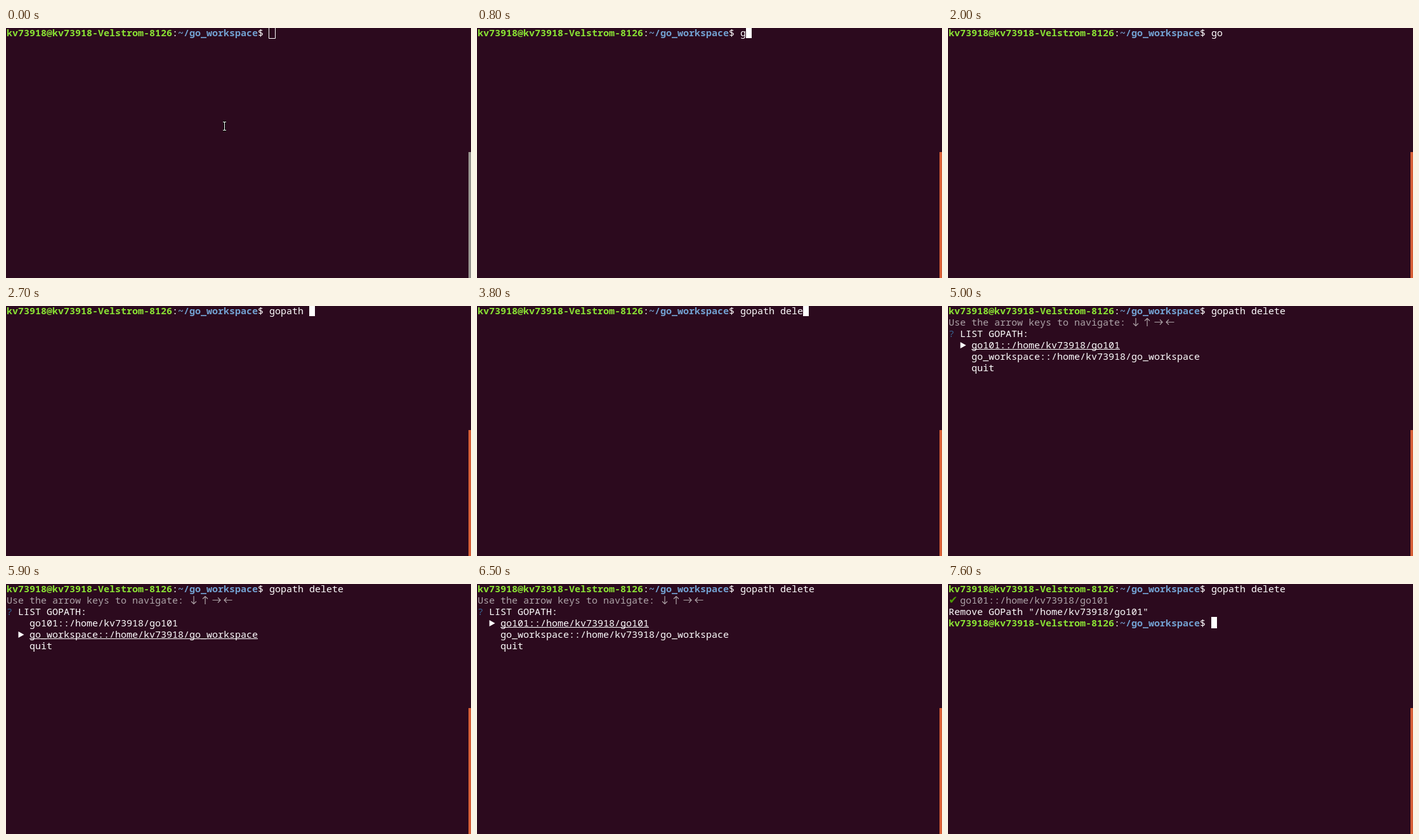
These frames come from a looping animation (733 by 395 pixels, 8000 ms). An HTML page with a canvas:

```html
<!DOCTYPE html>
<html lang="en">
<head>
<meta charset="utf-8">
<title>gopath delete</title>
<style>
  html, body { margin: 0; width: 100%; height: 100%; overflow: hidden; background: #2c0a1e; }
  canvas { display: block; }
</style>
</head>
<body>
<canvas id="stage" width="733" height="395"></canvas>
<script>
const ctx = document.getElementById('stage').getContext('2d');
const LOOP = 8000, CELL = 9, ROW = 18;
const BG = '#2c0a1e', WHITE = '#ffffff', DIM = '#ada3a8', GREEN = '#8ae234', BLUE = '#729fcf';
const USER = 'kv73918', HOST = USER + '-Velstrom-8126';
const PROMPT_LENGTH = `${USER}@${HOST}:~/go_workspace$ `.length;
const OPTIONS = [`go101::/home/${USER}/go101`, `go_workspace::/home/${USER}/go_workspace`, 'quit'];

// Time, typed command, cursor style
const TYPING = [
  [0, '', 'hollow'], [400, '', 'solid'], [800, 'g', 'solid'], [1000, 'go', 'solid'],
  [2000, 'go', 'off'], [2400, 'go', 'solid'], [2500, 'gop', 'solid'], [2700, 'gopath ', 'solid'],
  [3500, 'gopath d', 'solid'], [3600, 'gopath de', 'solid'], [3700, 'gopath del', 'solid'],
  [3800, 'gopath dele', 'solid'], [4000, 'gopath delet', 'solid'],
  [4200, 'gopath delete', 'solid'], [4600, 'gopath delete', 'off']
];

const cellX = col => 1 + col * CELL;

function rect(x, y, w, h, color) {
  ctx.fillStyle = color;
  ctx.fillRect(x, y, w, h);
}

function line(path, color, width) {
  ctx.strokeStyle = color;
  ctx.lineWidth = width;
  ctx.stroke(new Path2D(path));
}

function write(text, col, row, color = WHITE, bold = false) {
  ctx.font = `${bold ? 'bold ' : ''}15px "Noto Sans Mono", monospace`;
  ctx.fillStyle = color;
  ctx.fillText(text, cellX(col), 13 + row * ROW);
  return col + text.length;
}

function prompt(row) {
  let col = write(`${USER}@${HOST}`, 0, row, GREEN, true);
  col = write(':', col, row);
  col = write('~/go_workspace', col, row, BLUE, true);
  write('$', col, row);
}

function cursor(col, row, style) {
  const x = cellX(col), y = row * ROW - 2;
  if (style === 'solid') rect(x, y, CELL, ROW, WHITE);
  // The top edge lies above the visible area.
  if (style === 'hollow') line(`M${x - 0.5} 0V16.5H${x + CELL + 0.5}V0`, WHITE, 1);
}

function arrow(x, y, angle) {
  ctx.save();
  ctx.translate(x, y);
  ctx.rotate(angle);
  line('M-6.5 0H6M2 -4L6 0L2 4', DIM, 1.2);
  ctx.restore();
}

function menu(selected) {
  write('Use the arrow keys to navigate:', 0, 1, DIM);
  [1, -1, 0, 2].forEach((turns, i) => arrow(296 + i * 18, 25.5, turns * Math.PI / 2));
  write('?', 0, 2, '#37618f');
  write('LIST GOPATH:', 2, 2);
  OPTIONS.forEach((option, i) => write(option, 4, 3 + i));

  const top = (3 + selected) * ROW;
  ctx.fillStyle = WHITE;
  ctx.fill(new Path2D(`M19.5 ${top + 3}L28.5 ${top + 8}L19.5 ${top + 13}Z`));
  rect(cellX(4), top + 14, OPTIONS[selected].length * CELL, 1, WHITE);
}

function result() {
  ctx.font = '17px "DejaVu Sans", sans-serif';
  ctx.fillStyle = '#4e9a06';
  ctx.fillText('✔', 1, 31);
  write(OPTIONS[0], 2, 1, DIM);
  write(`Remove GOPath "/home/${USER}/go101"`, 0, 2);
  prompt(3);
  cursor(PROMPT_LENGTH, 3, 'solid');
}

function scrollbar(t) {
  rect(729, 196, 4, 199, t < 400 ? '#999690' : t < 500 ? '#b87b64' : '#d65f37');
}

function pointer() {
  const beam = 'M342 148.5H347M344.5 149V161M342 161.5H347';
  line(beam, '#000000', 3);
  line(beam, '#ffffff', 1);
}

function draw(t) {
  rect(0, 0, 733, 395, BG);
  scrollbar(t);
  prompt(0);

  const [, command, style] = TYPING.findLast(([start]) => t >= start);
  write(command, PROMPT_LENGTH, 0);
  cursor(PROMPT_LENGTH + command.length, 0, style);

  if (t < 800) pointer();
  if (t >= 7600) result();
  else if (t >= 5000) menu(t >= 5900 && t < 6500 ? 1 : 0);
}

const began = performance.now();
function animate() {
  draw((performance.now() - began) % LOOP);
  requestAnimationFrame(animate);
}
animate();
</script>
</body>
</html>
```
